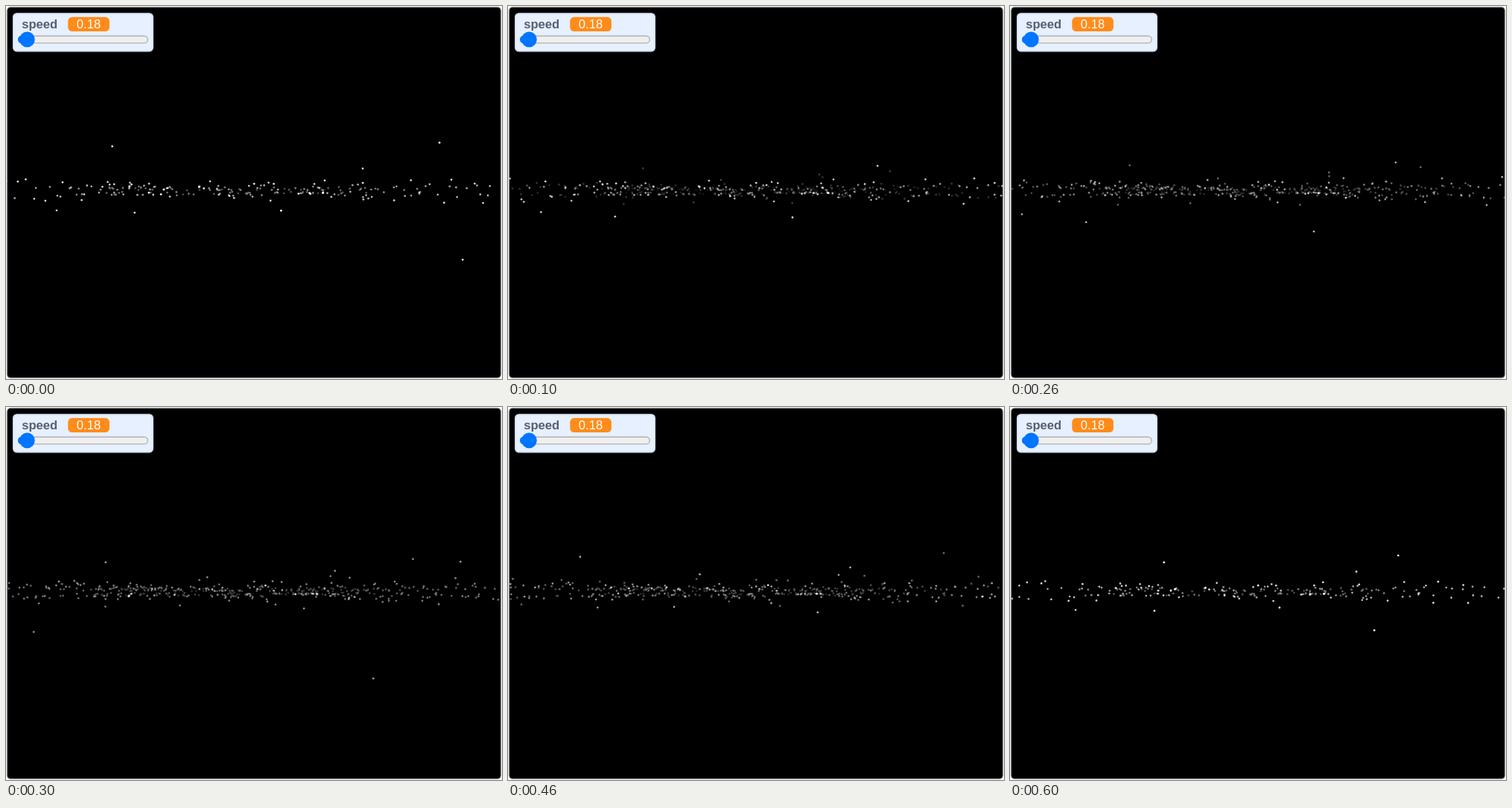
An HTML page with a canvas for the animation above (0.7 s loop, 666 by 500 pixels).

```html
<!DOCTYPE html>
<html lang="en">
<head>
<meta charset="utf-8">
<title>Star flight</title>
<style>
  html, body { margin: 0; width: 100%; height: 100%; overflow: hidden; background: #fff; }
  canvas, svg { position: absolute; left: 0; top: 0; display: block; }
  text { font: 16.6px "Liberation Sans", Arial, sans-serif; }
  .label { font-weight: bold; }
</style>
</head>
<body>
<canvas id="sky" width="666" height="500"></canvas>
<svg width="666" height="500" viewBox="0 0 666 500">
  <rect x="1" y="1" width="664" height="498" rx="5" fill="none" stroke="#d5dadd" stroke-width="1.4"/>
  <rect x="9.6" y="9.8" width="187.8" height="51" rx="5" fill="#e6f0ff" stroke="#c9d5e3" stroke-width="1.3"/>
  <text class="label" x="21.2" y="29.8" fill="#575e75">speed</text>
  <rect x="83.3" y="14.8" width="55.6" height="19.2" rx="5.4" fill="#ff8c1a"/>
  <text x="111" y="30" text-anchor="middle" fill="#fff">0.18</text>
  <rect x="16.7" y="40.2" width="173.6" height="9.4" rx="4.7" fill="#efefef" stroke="#b2b2b2" stroke-width="1.4"/>
  <rect x="16" y="39.5" width="16" height="10.8" rx="5.4" fill="#0075ff"/>
  <circle cx="28.4" cy="44.9" r="10.3" fill="#0075ff"/>
</svg>
<script>
const ctx = document.getElementById('sky').getContext('2d');
const CX = 333, CY = 248;      // vanishing point
const STEP = 100, STEPS = 7;
const COUNT = 265;

let seed = 41;
function rand(from, to) {
  seed = (seed * 16807) % 2147483647;
  return from + (to - from) * seed / 2147483647;
}

// The few stars that leave the band: x, y, and steps left when the loop starts.
const strays = [
  [-375, -118, 1.97], [772, -201, 3.1], [353, 116, 1.26], [141, 102, 3.88],
  [-1275, -255, 2.4], [1387, -287, 9.5], [1026, -150, -0.3], [-1050, 190, 6.55],
  [-3233, 317, 12.2], [1092, -163, 11.5]
].map(([x, y, depth]) => ({ x, y, depth }));

// The band is a wide, flat field with every depth equally likely.
const band = Array.from({ length: COUNT }, () => ({
  x: rand(-8600, 7600),
  y: rand(40, 230) * Math.sign(rand(-1, 1)),
  depth: rand(8, 52)
}));
const stars = [...strays, ...band];

function drawField(step, weight) {
  // Small dots keep more of their light than a linear fade would leave.
  ctx.globalAlpha = weight ** 0.75;
  for (const { x, y, depth } of stars) {
    const z = depth + STEPS - step;
    if (z < 0.5) continue;
    const light = Math.max(75, Math.min(255, 270 - 4 * z));
    ctx.fillStyle = `rgb(${light},${light},${light})`;
    ctx.beginPath();
    ctx.arc(CX + x / z, CY + y / z, 1.35, 0, 2 * Math.PI);
    ctx.fill();
  }
}

function draw(k) {
  ctx.clearRect(0, 0, 666, 500);
  ctx.save();
  ctx.globalAlpha = 1;
  ctx.fillStyle = '#000';
  ctx.beginPath();
  ctx.roundRect(1, 1, 664, 498, 5);
  ctx.fill();
  ctx.clip();
  // The end of the flight cross-fades into its beginning.
  ctx.globalCompositeOperation = 'lighter';
  const mix = k / (STEPS - 1);
  drawField(k, mix);
  drawField(k + STEPS, 1 - mix);
  ctx.restore();
}

const start = performance.now();
let shown = -1;
function tick() {
  const k = Math.floor((performance.now() - start) / STEP) % STEPS;
  if (k !== shown) draw(shown = k);
  requestAnimationFrame(tick);
}
tick();
</script>
</body>
</html>
```
